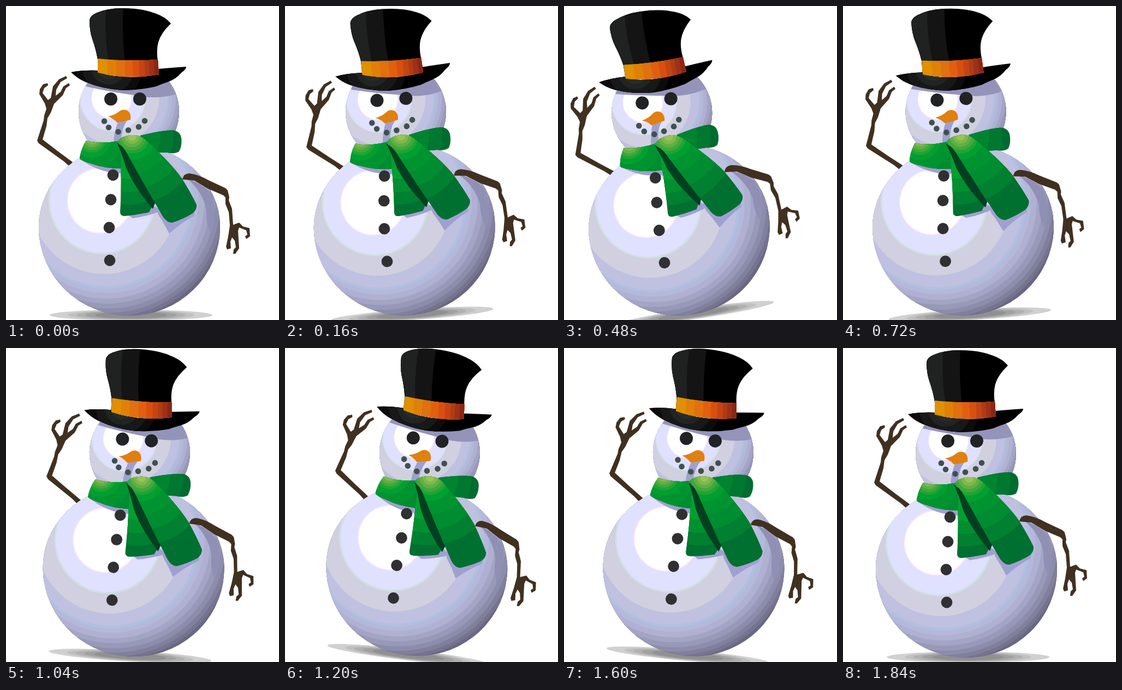
These frames come from a looping animation (500x574 px, 1920 ms). An HTML page:

```html
<!DOCTYPE html>
<html lang="en">
<head>
<meta charset="utf-8">
<title>Rocking snowman</title>
<style>
html, body { margin: 0; width: 100%; height: 100%; overflow: hidden; background: #fff; }
svg { display: block; }
</style>
</head>
<body>
<svg width="500" height="574" viewBox="0 0 500 574">
<defs>
  <clipPath id="bodyClip"><path d="M60 404A166 151 0 0 1 392 404A166 162 0 0 1 60 404Z"/></clipPath>
  <clipPath id="headClip"><circle cx="225" cy="193" r="92"/></clipPath>
  <clipPath id="crownClip"><path id="crown" d="M153 26Q154 18 165 13Q185 4 213 4Q250 4 275 14Q292 20 302 32Q284 49 279 66Q275 80 278 100L280 125Q225 135 168 122L168 98Q165 80 158 60Q153 45 153 26Z"/></clipPath>
  <clipPath id="brimClip"><path id="brim" d="M119 121Q140 117 168 118L168 122Q200 131 235 130Q262 129 280 124L279 115Q300 113 330 111Q330 116 321 122Q311 134 296 139Q284 143 275 147Q245 154 214 154Q178 152 146 139Q130 132 119 121Z"/></clipPath>
  <clipPath id="bandClip"><path d="M168 96Q220 102 278 98L280 125Q225 135 168 122Z"/></clipPath>
  <clipPath id="wrapClip"><path d="M147 246Q172 253 205 247L212 270L213 297Q180 297 156 288Q138 283 135 279Q137 262 147 246Z"/></clipPath>
  <clipPath id="backClip"><path d="M246 237Q285 227 306 227Q319 229 321 241Q323 255 317 266Q309 271 296 268L262 268Z"/></clipPath>
  <clipPath id="shortClip"><path d="M210 265Q217 290 240 324L268 366L262 377Q240 382 217 384Q209 384 209 376Q212 335 210 265Z"/></clipPath>
  <clipPath id="longClip"><path d="M203 249Q212 237 230 236Q246 235 258 247Q302 287 322 315Q339 342 349 363Q350 372 342 379Q326 389 305 396Q296 397 288 386L268 352Q247 315 226 277Q215 255 203 249Z"/></clipPath>
</defs>
<g id="man">
  <g id="ground"></g>
  <path fill="#403020" d="M124 287L115 292L106 284L60 251L57 246L69 209L70 200L74 188L71 178L61 161L62 152L68 143L76 141L77 145L70 150L67 159L77 172L82 168L86 147L97 134L110 128L112 132L100 139L92 153L91 164L100 157L105 147L115 141L117 145L110 150L104 163L88 179L82 195L76 205L74 220L67 244L97 267L112 278Z"/>
  <g id="body" clip-path="url(#bodyClip)"></g>
  <path fill="#9090b4" d="M333 316Q365 327 378 347Q388 382 376 416Q366 400 367 372Q360 340 333 316Z"/>
  <g fill="#a0a0d0">
    <path d="M135 279L213 294L213 306Q170 306 135 279Z"/>
    <path d="M225 383L272 366L285 374Q262 384 232 388Z"/>
    <path d="M278 372L345 372L344 384Q320 397 299 416Q290 398 278 380Z"/>
  </g>
  <g id="head" clip-path="url(#headClip)"></g>
  <g clip-path="url(#headClip)">
    <path fill="#9494ba" d="M146 130H312V161Q275 172 235 163Q190 157 146 147Z"/>
    <path fill="#a0a0cc" d="M205 212L222 209Q211 224 211 248L197 250Q198 229 205 212Z"/>
  </g>
  <g id="wrap" clip-path="url(#wrapClip)"></g>
  <g id="back" clip-path="url(#backClip)"></g>
  <g id="short" clip-path="url(#shortClip)"></g>
  <path fill="#004020" d="M203 249L235 275L275 355L269 371Q236 333 220 296Q211 266 203 249Z"/>
  <g id="long" clip-path="url(#longClip)"></g>
  <path fill="#e08010" d="M187 202Q200 199 207 193Q214 187 222 191Q230 196 228 208Q216 211 203 213Q198 206 187 202Z"/>
  <g id="dots"></g>
  <use href="#crown"/><use href="#brim"/>
  <g clip-path="url(#crownClip)">
    <path fill="#141414" d="M145 0H215Q212 50 218 104H150Z"/>
    <path fill="#202222" d="M145 0H184Q179 45 188 104H150Z"/>
  </g>
  <g id="band" clip-path="url(#bandClip)"></g>
  <g id="brimGlow" clip-path="url(#brimClip)"></g>
  <path fill="#403020" d="M323 317Q325 306 336 306Q352 308 370 318L402 333L406 337L409 350L408 355L414 371L415 386L416 400L427 396L434 403L446 406L447 421L440 426L438 421L442 418L440 410L427 405L425 411L426 428L427 443L420 453L416 453L417 445L421 441L419 429L414 423L411 431L412 443L405 445L403 440L407 421L410 401L408 377L402 362L402 350L398 346L370 334L345 319Z"/>
</g>
</svg>
<script>
const $ = id => document.getElementById(id);
const disc = (id, x, y, r, fill, ry = r) => $(id).insertAdjacentHTML('beforeend',
  `<ellipse cx="${x}" cy="${y}" rx="${r}" ry="${ry}" fill="${fill}"/>`);
const rings = (id, x, y, list, scale = 1, drift = 0) => list.forEach(([r, fill]) =>
  disc(id, x + drift * r * scale, y, r * scale, fill));

const snow = [
  [260, '#606078'], [224, '#686882'], [218, '#747490'], [212, '#80809c'],
  [205, '#8c8cac'], [197, '#9898b8'], [188, '#a4a4c6'], [179, '#b0b0d2'],
  [169, '#b4b8da'], [161, '#b0c0e0'], [156, '#c0c0e0'], [134, '#d0d0e0'],
  [98, '#d0e0e0'], [95, '#e0e0ff'], [60, '#ffe8f8'], [58, '#fff']
];
rings('body', 165, 356, snow, 1, .11);
rings('head', 190, 169, snow, .62, .09);

// Scarf shading: broad bands around the lit folds
const green = [
  [200, '#007030'], [124, '#008030'], [96, '#008c30'], [68, '#009430'],
  [43, '#00a030'], [32, '#20a434'], [26, '#40a83c'], [20, '#60b044'],
  [14, '#80b84c'], [8, '#98c458']
];
rings('wrap', 157, 241, green, .85);
rings('long', 231, 238, green);
rings('short', 225, 262, [[200, '#007030'], [101, '#008030'], [78, '#009030'], [54, '#00a030']]);
rings('back', 225, 238, [[120, '#006c30'], [82, '#007830'], [58, '#008430']]);
rings('brimGlow', 188, 112, [[62, '#0c0c0c'], [48, '#181818'], [32, '#202422'], [22, '#282c28']]);

[[149, '#d0d0d0', 10], [116, '#c0c0c0', 9], [100, '#b0b0b0', 8], [84, '#a0a0a0', 7], [66, '#909090', 6]]
  .forEach(([rx, fill, ry]) => disc('ground', 229, 565, rx, fill, ry));

[[192, 170], [245, 170]].forEach(([x, y]) => disc('dots', x, y, 12, '#202224'));
[[196, 309], [192, 354], [189, 405], [190, 465]].forEach(([x, y]) => disc('dots', x, y, 10.4, '#303032'));
[[180, 210.5], [188, 222], [205.5, 230], [224, 227], [243, 221], [254, 210]]
  .forEach(([x, y]) => disc('dots', x, y, 5.3, '#405050'));

[[166, '#e09000'], [185, '#e08008'], [201, '#e07010'], [217, '#e06010'], [231, '#d85010'],
 [243, '#c44414'], [253, '#b03c14'], [261, '#a03018'], [270, '#882814']].forEach(([x, fill]) =>
  $('band').insertAdjacentHTML('beforeend',
    `<path fill="${fill}" d="M${x} 90h${285 - x}v45H${x + 2}z"/>`));

// Lean in degrees for each 80 ms step: left, across to the right, back upright
const lean = k => k <= 5 ? -2 * k : k <= 17 ? (k - 11) * 5 / 3 : (23 - k) * 5 / 3;

const start = performance.now();
function draw(now) {
  const step = Math.floor(Math.max(0, now - start) % 1920 / 80);
  const angle = lean(step);
  const pivot = angle < 0 ? '217 508' : '262 535';
  $('man').setAttribute('transform', `rotate(${angle} ${pivot})`);
  requestAnimationFrame(draw);
}
draw(start);
</script>
</body>
</html>
```
